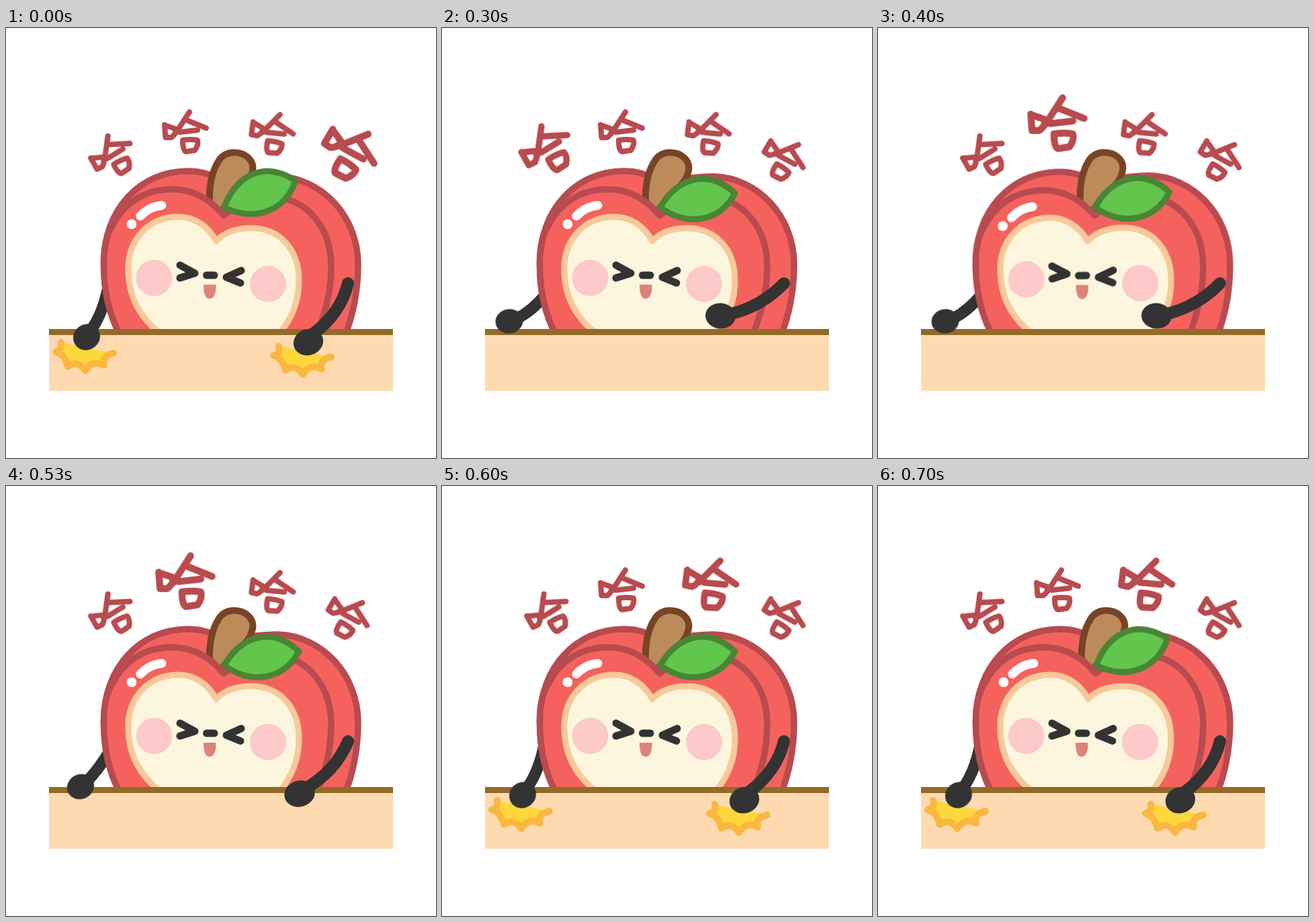
An HTML page for the animation above (800 ms loop, 640 by 640 pixels).

```html
<!DOCTYPE html>
<html lang="zh">
<head>
<meta charset="utf-8">
<title>Laughing apple</title>
<style>
  html, body { margin: 0; width: 100%; height: 100%; overflow: hidden; background: #fff; }
  svg { display: block; width: 100vw; height: 100vh; }
  path { stroke-linecap: round; stroke-linejoin: round; }
  .skin { fill: #f5625d; stroke: #b84b4f; stroke-width: 9.5; }
  .line { fill: none; }
  .dark { stroke: #333; }
  .hand { fill: #333; }
  #apple { transform-origin: 330px 360px; }
  #leaf { transform-origin: 325px 267px; }
</style>
</head>
<body>
<svg viewBox="0 0 640 640">
  <defs>
    <g id="ha" class="line" stroke="#b84b4f" stroke-width="8">
      <path d="M-31 -10L-29.500 9L-21 9Q-13 3 -15 -4L-28 -8.500"/>
      <path d="M6 -29L-14 2M-1 -18L31 -5M-8 1L18 -2"/>
      <path d="M-4 13Q-4 29 1 30L14 28Q20 20 18 13Q8 11 -4 13Z"/>
    </g>
    <path id="burst" fill="#fdd83b" stroke="#fab741" stroke-width="10"
      d="M82 468Q85 479 74 482Q87 485 92 504Q106 493 118 510Q129 493 146 502Q142 488 160 484"/>
  </defs>

  <g id="words"></g>
  <g id="back" class="line dark" stroke-width="17"></g>

  <g id="apple">
    <path class="skin" d="M172 462C152 424 145.500 390 145.500 350C145.500 270 200 213 270 213C290 213 304 217 320 227C350 228 370 221 405 221C470 223 524 280 524 352C524 395 516 430 503 462"/>
    <path fill="#bd8b5a" stroke="#774526" stroke-width="10"
      d="M303 262C302 235 307 212 317 197C328 181 353 182 364 197C370 206 367 214 364 222C356 238 338 250 324 268"/>
    <path class="skin" d="M172 462C152 424 145.500 390 145.500 350C145.500 325 151 305 158 295C174 262 205 240 247 240C280 240 305 256 324 279C345 262 370 252 395 252C450 252 484 300 484 355C484 395 474 430 460 462"/>
    <g id="leaf">
      <path fill="#62c64c" stroke="#498534" stroke-width="9"
        d="M325 267C345 230 390 204 436 246C415 288 365 297 325 267Z"/>
    </g>
    <path class="line" stroke="#fff" stroke-width="13" d="M200 280Q213 266 232 264"/>
    <circle cx="187" cy="292" r="7.3" fill="#fff"/>
    <path fill="#fdf6de" stroke="#f8c99a" stroke-width="9"
      d="M313 317C300 294 280 281 257 281C212 281 182 315 182 358C182 400 198 430 232 457L405 457C427 432 436 405 436 376C436 330 408 298 365 298C343 298 325 304 313 317Z"/>
    <g fill="#fccac8">
      <circle cx="220.5" cy="372" r="27"/>
      <circle cx="390" cy="381" r="27"/>
    </g>
    <path class="line dark" stroke-width="11"
      d="M259 353L281 365L259 372M350 361L328 371L349 379.500M298.500 368H310"/>
    <path fill="#dc8478" d="M294 382H312.500C313 394 310 403 303 403C296 403 294 394 294 382Z"/>
  </g>

  <path fill="#ffdab0" d="M64 448H576V540H64Z"/>
  <path fill="#946a28" d="M64 448H576V457H64Z"/>
  <g id="bursts">
    <use href="#burst"/>
    <use href="#burst" transform="translate(324 5.500)"/>
  </g>
  <g id="front"></g>
</svg>

<script>
const LOOP = 800;
const $ = id => document.getElementById(id);
const clockStart = document.timeline.currentTime || 0;

function add(parent, tag, attrs) {
  const el = document.createElementNS('http://www.w3.org/2000/svg', tag);
  for (const k in attrs) el.setAttribute(k, attrs[k]);
  return parent.appendChild(el);
}

// Plays [time, value] steps as hard changes on one shared clock.
function steps(el, prop, list) {
  const frames = list.map(([t, v]) => ({ offset: t / LOOP, [prop]: v, easing: 'step-end' }));
  frames.push({ offset: 1, [prop]: list[list.length - 1][1] });
  el.animate(frames, { duration: LOOP, iterations: Infinity }).startTime = clockStart;
}

// Holds `on` during [from, to) and `off` for the rest of the loop.
function span(el, prop, from, to, on, off) {
  const list = [[from, on]];
  if (from > 0) list.unshift([0, off]);
  if (to < LOOP) list.push([to, off]);
  steps(el, prop, list);
}

// Laughing words: x, y, tilt, then the offset, scale and start while enlarged.
const words = [
  [158.5, 189.5, -25, -2.5, -9.5, 1.17, 200],
  [267, 154, 0, 0, -13, 1.28, 400],
  [396, 156, 12, 3.5, -11.5, 1.22, 600],
  [509, 194, 35, 2.5, -10, 1.28, 0]
];
for (const [x, y, tilt, dx, dy, scale, start] of words) {
  const place = (mx, my, s) =>
    `translate(${x + mx}px, ${y + my}px) rotate(${tilt}deg) scale(${s})`;
  const word = add($('words'), 'use', { href: '#ha' });
  span(word, 'transform', start, start + 200, place(dx, dy, scale), place(0, 0, 1));
}

// Arm poses: visible spans, arm curves and hands as [x, y, rx, ry, tilt].
const arms = [
  { spans: [[0, 200], [600, LOOP]],
    left: 'M153 380Q146 420 129 446', leftHand: [120, 460, 20.5, 19, -35],
    right: 'M509 380Q498 425 456 456', rightHand: [450, 467.5, 22.5, 19.5, -20] },
  { spans: [[200, 300]],
    left: 'M97 400Q120 411 154 406', leftHand: [89.5, 393.5, 18, 21, -8],
    right: 'M509 383Q480 418 410 406', rightHand: [402, 398.5, 18.5, 23, -15] },
  { spans: [[300, 500]],
    left: 'M154 397Q133 422 112 432', leftHand: [100, 436.5, 20.5, 18, -8],
    right: 'M509 380Q475 415 428 426', rightHand: [414.5, 428.5, 22.5, 19, 5] },
  { spans: [[500, 600]],
    left: 'M154 395Q137 423 120 440', leftHand: [111, 447.5, 20.5, 18.5, -25],
    right: 'M509 380Q490 425 446 450', rightHand: [437, 458, 23, 19.5, -15] }
];

function hand(parent, [x, y, rx, ry, tilt]) {
  add(parent, 'ellipse', { class: 'hand', rx, ry, transform: `translate(${x} ${y}) rotate(${tilt})` });
}

for (const pose of arms) {
  for (const [from, to] of pose.spans) {
    const behind = add($('back'), 'path', { d: pose.left });
    const g = add($('front'), 'g', {});
    add(g, 'path', { class: 'line dark', 'stroke-width': 18, d: pose.right });
    hand(g, pose.leftHand);
    hand(g, pose.rightHand);
    for (const el of [behind, g]) span(el, 'opacity', from, to, 1, 0);
  }
}

const turns = list => list.map(([t, deg]) => [t, `rotate(${deg}deg)`]);
steps($('bursts'), 'opacity', [[0, 1], [200, 0], [600, 1]]);
steps($('leaf'), 'transform', turns([[0, -10], [200, 0], [670, -5], [700, -10]]));
steps($('apple'), 'transform', turns([[0, 0], [400, -1.1], [470, -0.7], [500, -0.35], [530, 0]]));
</script>
</body>
</html>
```
